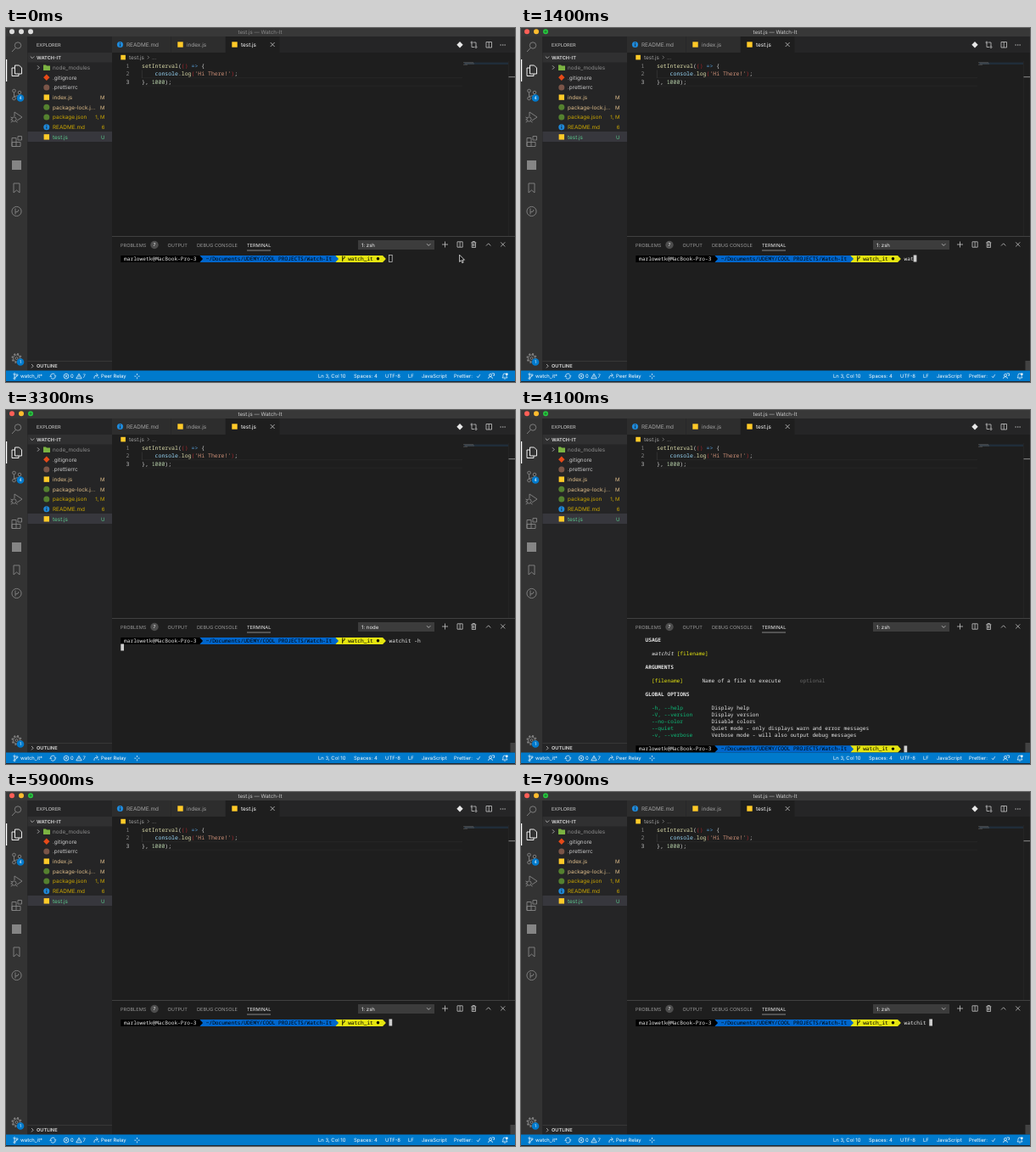
An HTML page that plays this animation: 600x417 px, repeating every 8000 ms.

```html
<!DOCTYPE html>
<html lang="en">
<head>
<meta charset="utf-8">
<title>Editor session</title>
<style>
html, body { margin: 0; width: 100%; height: 100%; overflow: hidden; background: #1e1e1e; }
svg { display: block; width: 600px; height: 417px; }
text { white-space: pre; text-rendering: geometricPrecision; font: 6.4px Inter, "Open Sans", sans-serif; fill: #ccc; }
.caps text { font-size: 5.6px; }
.status text { font-size: 5.9px; fill: #fff; }
.code text { font: 500 6.5px "Noto Sans Mono", "DejaVu Sans Mono", monospace; fill: #d4d4d4; }
.term text { font: 500 6.2px "Noto Sans Mono", "DejaVu Sans Mono", monospace; fill: #e5e5e5; }
.line { fill: none; stroke: #858585; stroke-width: .9; }
.thin { fill: none; stroke: #c5c5c5; stroke-width: .8; }
.status .thin { stroke: #fff; stroke-width: .7; }
text.badge { font-size: 5px; fill: #fff; text-anchor: middle; }
text.bold { font-weight: 700; }
.lights circle { fill: #dcdcdc; }
#title { font-size: 6.2px; fill: #8a8a8a; }
.lights path, #slider { display: none; }
.focused .lights circle:nth-child(1) { fill: #ff5f57; }
.focused .lights circle:nth-child(2) { fill: #febc2e; }
.focused .lights circle:nth-child(3) { fill: #28c840; }
.focused .lights path, .focused #slider { display: inline; }
.focused #title { fill: #ccc; }
#caret { fill: none; stroke: #d0d0d0; stroke-width: .7; }
.focused #caret { fill: #cfcfcf; stroke: none; }
</style>
</head>
<body>
<svg id="stage" viewBox="0 0 600 417">
  <rect width="600" height="417" fill="#1e1e1e"/>

  <!-- title bar -->
  <rect width="600" height="10" fill="#383838"/>
  <g class="lights">
    <circle cx="7" cy="4.3" r="3"/><circle cx="18" cy="4.3" r="3"/><circle cx="29" cy="4.3" r="3"/>
    <path d="M27.4 4.3h3.2M29 2.7v3.2" stroke="#176b25" stroke-width=".7"/>
  </g>
  <text id="title" x="299.5" y="6.5" text-anchor="middle">test.js — Watch-It</text>

  <!-- activity bar -->
  <rect y="10" width="25.5" height="394" fill="#333"/>
  <rect y="37" width="1.2" height="26" fill="#fff"/>
  <g class="line">
    <circle cx="14" cy="20.5" r="3.7"/><path d="M11.3 23.4L7 28"/>
    <path d="M10.5 44h5l3 3v7h-8zM10.5 47H7v9.5h8V54" stroke="#fff"/>
    <circle cx="9.5" cy="74" r="1.8"/><circle cx="16" cy="76" r="1.8"/><circle cx="9.5" cy="83" r="1.8"/>
    <path d="M9.5 76v5M16 78q0 2-6 2.5"/>
    <path d="M10 104v-5l9 6-6 4"/><circle cx="9.5" cy="107.5" r="2.6"/><path d="M5.5 105l2 1M5.5 108h1.5M5.7 111l2-1M13.5 111l-2-1"/>
    <path d="M7 129.5h5v10H7zM7 134.5h10v5H7zM14 127.5h4.5v4.5H14z"/>
    <path d="M9 183h7v11l-3.5-3-3.5 3z"/>
    <circle cx="12.5" cy="216" r="5.6"/><path d="M11 212.5v7M11 217q4 0 4-3"/>
    <circle cx="12.5" cy="389" r="4"/><circle cx="12.5" cy="389" r="1.5"/>
    <circle cx="12.5" cy="389" r="5.2" stroke-dasharray="2 2.08" stroke-width="1.6"/>
  </g>
  <rect x="7" y="156" width="11" height="11" fill="#858585"/>
  <circle cx="17" cy="82.5" r="4.3" fill="#007acc"/><text class="badge" x="17" y="84.4">4</text>
  <circle cx="17" cy="393.5" r="4.3" fill="#007acc"/><text class="badge" x="17" y="395.4">1</text>

  <!-- side bar -->
  <rect x="25.5" y="10" width="99.5" height="394" fill="#252526"/>
  <rect x="25.5" y="29" width="99.5" height="11.5" fill="#303031"/>
  <rect x="25.5" y="122" width="99.5" height="12" fill="#37373d"/>
  <path d="M25.5 392.5H125" stroke="#3c3c3c" stroke-width=".8"/>
  <g class="caps">
    <text x="36" y="22">EXPLORER</text>
    <text class="bold" x="36" y="36.7">WATCH-IT</text>
    <text class="bold" x="36" y="400.2">OUTLINE</text>
  </g>
  <path class="thin" d="M28.8 33.5l2.2 2.2 2.2-2.2M30 396l2.2 2.2-2.2 2.2M37 44.3l2.2 2.2-2.2 2.2"/>
  <g id="files"></g>

  <!-- tabs -->
  <rect x="125" y="10" width="475" height="19" fill="#252526"/>
  <rect x="125" y="10" width="69.5" height="19" fill="#2d2d2d"/>
  <rect x="195" y="10" width="63.5" height="19" fill="#2d2d2d"/>
  <rect x="259" y="10" width="63.5" height="19" fill="#1e1e1e"/>
  <circle cx="134.5" cy="19.5" r="3.6" fill="#1e88d8"/><path d="M134.5 18.8v2.8M134.5 17v1" stroke="#222" stroke-width=".9"/>
  <text x="142" y="21.9" style="fill:#a3a3a3">README.md</text>
  <rect x="202.3" y="16.3" width="6.4" height="6.4" fill="#ffca28"/>
  <text x="213" y="21.9" style="fill:#a3a3a3">index.js</text>
  <rect x="266.3" y="16.3" width="6.4" height="6.4" fill="#ffca28"/>
  <text x="277" y="21.9" style="fill:#fff">test.js</text>
  <path class="thin" d="M311.7 17l5 5m0-5l-5 5"/>
  <rect x="532.4" y="17.2" width="5.2" height="5.2" fill="#e8e8e8" transform="rotate(45 535 19.8)"/>
  <g class="thin">
    <circle cx="549" cy="17" r="1"/><circle cx="554" cy="22.5" r="1"/>
    <path d="M549 18v4.5h3M554 21.5V17h-3M566 16.5h6.5v6.5H566zM569.2 16.5V23"/>
  </g>
  <path d="M582.5 20h1.3M585 20h1.3M587.5 20h1.3" stroke="#ccc" stroke-width="1.1"/>

  <!-- editor -->
  <rect x="135.3" y="31.8" width="5.6" height="5.6" fill="#ffca28"/>
  <text x="145" y="36.9" style="fill:#a0a0a0">test.js</text>
  <path class="thin" d="M166.8 32.8l1.8 1.8-1.8 1.8" style="stroke:#888"/>
  <text x="172" y="36.9" style="fill:#a0a0a0">...</text>
  <path d="M160 58.7H538M160 68.2H538" stroke="#282828" stroke-width=".8"/>
  <path d="M160.3 49.5v9.5" stroke="#404040" stroke-width=".6"/>
  <g class="code" id="code"></g>
  <path d="M540 41.8H592" stroke="#24415a" stroke-width="2.4" opacity=".45"/>
  <path d="M539 40.7h12M541 42h11M539 43.2h5" stroke="#696969" stroke-width=".6"/>
  <path d="M592.5 39V245" stroke="#272727" stroke-width=".7"/>
  <path d="M592.5 57.7H600" stroke="#8c8c8c" stroke-width="1"/>

  <!-- panel -->
  <path d="M125 245.5H600" stroke="#444" stroke-width=".9"/>
  <g class="caps">
    <text x="135" y="257.9" style="fill:#979797">PROBLEMS</text>
    <circle cx="175" cy="255.5" r="4.7" fill="#4d4d4d"/><text class="badge" x="175" y="257.4">7</text>
    <text x="190.5" y="257.9" style="fill:#979797">OUTPUT</text>
    <text x="225" y="257.9" style="fill:#979797">DEBUG CONSOLE</text>
    <text x="284" y="257.9" style="fill:#e7e7e7">TERMINAL</text>
  </g>
  <path d="M284 262h28" stroke="#d0d0d0" stroke-width=".6"/>
  <rect x="415" y="250" width="90" height="11" fill="#3c3c3c"/>
  <text id="shell" x="419" y="257.8" style="font-size:6px;fill:#f0f0f0"></text>
  <g class="thin">
    <path d="M496 254.2l2.2 2.2 2.2-2.2M514 255h7M517.5 251.5v7M532 251.8h6.2v6.4H532zM535.1 251.8v6.4"/>
    <path d="M548.3 252.8h6M550 252.8v-1.3h2.6v1.3M549.2 252.8v5.7h4.3v-5.7M550.6 254v3.3M552 254v3.3"/>
    <path d="M566 256.5l2.7-2.7 2.7 2.7M583.2 252.4l5 5m0-5l-5 5"/>
  </g>
  <g class="term">
    <g id="help"></g>
    <g id="prompt"></g>
    <text id="typed"></text>
    <rect id="caret" width="3.7" height="8"/>
  </g>
  <rect id="slider" x="594.5" y="392" width="5.5" height="11.5" fill="#424242"/>

  <!-- status bar -->
  <rect y="403.5" width="600" height="12.5" fill="#007acc"/>
  <rect y="416" width="600" height="1" fill="#1c2733"/>
  <g class="status" id="status">
    <g class="thin">
      <circle cx="10" cy="407.7" r="1"/><circle cx="10" cy="412.8" r="1"/><circle cx="13" cy="408.8" r="1"/>
      <path d="M10 408.7v3M13 409.8q0 1.4-3 1.7"/>
      <path d="M52.5 410a2.9 2.9 0 0 1 5.4-1.4M58.3 410.4a2.9 2.9 0 0 1-5.4 1.4M56.8 409.8h2.4M51.5 410.6h2.4"/>
      <circle cx="71" cy="410.2" r="2.9"/><path d="M69.8 409l2.4 2.4m0-2.4l-2.4 2.4"/>
      <path d="M86 407.3l3.2 5.6h-6.4zM86 409.3v2"/>
      <path d="M104 413v-2q0-2 4-2M106.3 407l2.2 2-2.2 2M109 412.5v-1.5"/>
      <path d="M154.5 407v2M154.5 411.4v2M151.4 410.2h2M155.6 410.2h2"/>
      <path d="M555 410.2l1.4 1.7 2.4-3.7"/>
      <circle cx="571" cy="409" r="1.5"/><path d="M568.5 413q0-2.3 2.5-2.3t2.5 2.3M572.5 407h3v2.5h-1.2"/>
      <path d="M585 412h6l-.9-1.4v-1.4q0-2.2-2.1-2.2t-2.1 2.2v1.4zM587.3 413.3h1.4"/>
    </g>
    <circle cx="590.3" cy="407.8" r="1.4" fill="#fff"/>
  </g>

  <path id="pointer" transform="translate(534.6 267.2)" d="M0 0v8.2l1.9-1.7 1.3 3 1.4-.6-1.3-2.9h2.6z" fill="#111" stroke="#eee" stroke-width=".8"/>
</svg>
<script>
const LOOP = 8000, STEP = 100;
const X0 = 135.3, CELL = 3.72, ROW0 = 271.5, ROW = 8;
const NS = 'http://www.w3.org/2000/svg';
const $ = id => document.getElementById(id);
const col = n => X0 + n * CELL;
const row = n => ROW0 + n * ROW;

function add(parent, tag, attrs, str) {
  const el = document.createElementNS(NS, tag);
  for (const k in attrs) el.setAttribute(k, attrs[k]);
  if (str) el.textContent = str;
  parent.appendChild(el);
  return el;
}
const label = (parent, x, y, str, style = '') => add(parent, 'text', { x, y, style }, str);
const show = (id, on) => { $(id).style.display = on ? '' : 'none'; };

// Explorer: name, text colour, icon shape, icon colour, mark
const AMBER = '#e2c08d', WARN = '#cca700';
[
  ['node_modules', '#8c8c8c', 'folder', '#7cb342', ''],
  ['.gitignore', '#ccc', 'diamond', '#e64a19', ''],
  ['.prettierrc', '#ccc', 'circle', '#7a5548', ''],
  ['index.js', AMBER, 'square', '#ffca28', 'M'],
  ['package-lock.j...', AMBER, 'circle', '#55812f', 'M'],
  ['package.json', WARN, 'circle', '#55812f', '1, M'],
  ['README.md', WARN, 'info', '#1e88d8', '6'],
  ['test.js', '#5cc98d', 'square', '#ffca28', 'U']
].forEach(([name, fill, shape, tint, mark], i) => {
  const g = $('files'), y = 46.6 + i * 11.68;
  if (shape === 'folder') add(g, 'path', { d: `M44 ${y - 3}h3l1 1h4v5.5h-8z`, fill: tint });
  else if (shape === 'square') add(g, 'rect', { x: 44.6, y: y - 3.2, width: 6.4, height: 6.4, fill: tint });
  else if (shape === 'diamond') add(g, 'path', { d: `M47.8 ${y - 3.7}l3.7 3.7-3.7 3.7-3.7-3.7z`, fill: tint });
  else add(g, 'circle', { cx: 47.8, cy: y, r: 3.5, fill: tint });
  if (shape === 'info') add(g, 'path', { d: `M47.8 ${y - .6}v2.7M47.8 ${y - 2.4}v1`, stroke: '#222', 'stroke-width': .9 });
  label(g, 55, y + 2.3, name, `fill:${fill}`);
  label(g, 116.5, y + 2.3, mark, `fill:${fill};text-anchor:end;font-size:6px`);
});

// Code: each line is a list of column, text, colour
const PLAIN = '#d4d4d4', BRACKET = '#a3262c', CALL = '#dcdcaa';
[
  [[0, 'setInterval', CALL], [11, '(', PLAIN], [12, '()', BRACKET], [15, '=>', '#569cd6'], [18, '{', PLAIN]],
  [[4, 'console', '#9cdcfe'], [11, '.', PLAIN], [12, 'log', CALL], [15, '(', BRACKET],
    [16, "'Hi There!'", '#ce9178'], [27, ')', BRACKET], [28, ';', PLAIN]],
  [[0, '},', PLAIN], [3, '1000', '#b5cea8'], [7, ');', PLAIN]]
].forEach((parts, i) => {
  const y = 46.8 + i * 9.65;
  label($('code'), 141.5, y, String(i + 1), `fill:${i === 2 ? '#c6c6c6' : '#858585'}`);
  parts.forEach(([c, s, fill]) => label($('code'), 160 + c * 3.9, y, s, `fill:${fill}`));
});

// Help output: row, column, text, style
const GREEN = 'fill:#0dbc79', YELLOW = 'fill:#e5e510', BOLD = 'font-weight:700';
[
  [0, 3, 'USAGE', BOLD], [2, 5, 'watchit', 'font-style:italic'], [2, 13, '[filename]', YELLOW],
  [4, 3, 'ARGUMENTS', BOLD], [6, 5, '[filename]', YELLOW],
  [6, 21, 'Name of a file to execute'], [6, 52, 'optional', 'fill:#666'],
  [8, 3, 'GLOBAL OPTIONS', BOLD],
  [10, 5, '-h, --help', GREEN], [10, 24, 'Display help'],
  [11, 5, '-V, --version', GREEN], [11, 24, 'Display version'],
  [12, 5, '--no-color', GREEN], [12, 24, 'Disable colors'],
  [13, 5, '--quiet', GREEN], [13, 24, 'Quiet mode - only displays warn and error messages'],
  [14, 5, '-v, --verbose', GREEN], [14, 24, 'Verbose mode - will also output debug messages']
].forEach(([r, c, s, style]) => label($('help'), col(c), row(r) + 1.8, s, style));

// Prompt: three arrow-tipped segments, drawn right to left so the tips overlap
const prompt = $('prompt');
[[68, 83, '#e5e510'], [25, 68, '#0066cc'], [0, 25, '#000']].forEach(([a, b, fill]) => {
  const l = col(a), r = col(b);
  add(prompt, 'path', { d: `M${l} ${ROW0 - 3.6}H${r}l3.8 4.1-3.8 4.1H${l}z`, fill });
});
label(prompt, col(1), ROW0 + 2, 'marlowetk@MacBook-Pro-3');
label(prompt, col(27), ROW0 + 2, '~/Documents/UDEMY/COOL PROJECTS/Watch-It', 'fill:#000');
label(prompt, col(72), ROW0 + 2, 'watch_it', 'fill:#000');
add(prompt, 'circle', { cx: col(81.5), cy: ROW0 + .2, r: 1.7, fill: '#000' });
add(prompt, 'path', {
  d: `M${col(70) + 1} ${ROW0 - 3}v6.4M${col(70) + 3.4} ${ROW0 - 2.6}v1.4q0 1.3-2.4 2`,
  fill: 'none', stroke: '#000', 'stroke-width': .9
});

[
  [17, 'watch_it*'], [76, '0'], [90.5, '7'], [112, 'Peer Relay'], [368, 'Ln 3, Col 10'], [410, 'Spaces: 4'],
  [447, 'UTF-8'], [474, 'LF'], [490, 'JavaScript'], [528, 'Prettier:']
].forEach(([x, s]) => label($('status'), x, 412.3, s));

// Typing: times at which each next character is present
const typing = [
  { from: 0, word: 'watchit -h', keys: [1100, 1200, 1400, 1600, 1800, 1900, 2000, 2600, 2800, 2900] },
  { from: 3600, word: 'clear', keys: [4900, 5000, 5200, 5300, 5500] },
  { from: 5800, word: 'watchit ', keys: [6500, 6600, 6800, 6900, 7100, 7200, 7400, 7600] }
];
const FOCUS = 200, ENTER = 3100, OUTPUT = 3500, CLEAR = 5800;

function draw(t) {
  const run = typing.filter(r => r.from <= t).pop();
  const text = run.word.slice(0, run.keys.filter(k => k <= t).length);
  const helpOn = t >= OUTPUT && t < CLEAR;
  const busy = t >= ENTER && t < OUTPUT + STEP;
  const promptOn = !(helpOn && busy);
  const line = helpOn ? 16 : 0;
  const shift = line * ROW - (helpOn ? .6 : 0);

  $('stage').classList.toggle('focused', t >= FOCUS);
  $('shell').textContent = busy && t > ENTER ? '1: node' : '1: zsh';
  show('help', helpOn);
  show('prompt', promptOn);
  prompt.setAttribute('transform', `translate(0 ${shift})`);

  const typed = $('typed');
  typed.textContent = promptOn ? text : '';
  typed.setAttribute('x', col(85));
  typed.setAttribute('y', ROW0 + 2 + shift);

  const caret = $('caret');
  caret.setAttribute('x', busy ? col(0) : col(85 + text.length));
  caret.setAttribute('y', row(busy && !helpOn ? 1 : line) - 4);

  // The pointer hides once typing begins
  show('pointer', t < typing[0].keys[0]);
}

const start = performance.now();
function frame() {
  const t = (performance.now() - start) % LOOP;
  draw(Math.floor(t / STEP) * STEP);
  requestAnimationFrame(frame);
}
draw(0);
requestAnimationFrame(frame);
</script>
</body>
</html>
```
